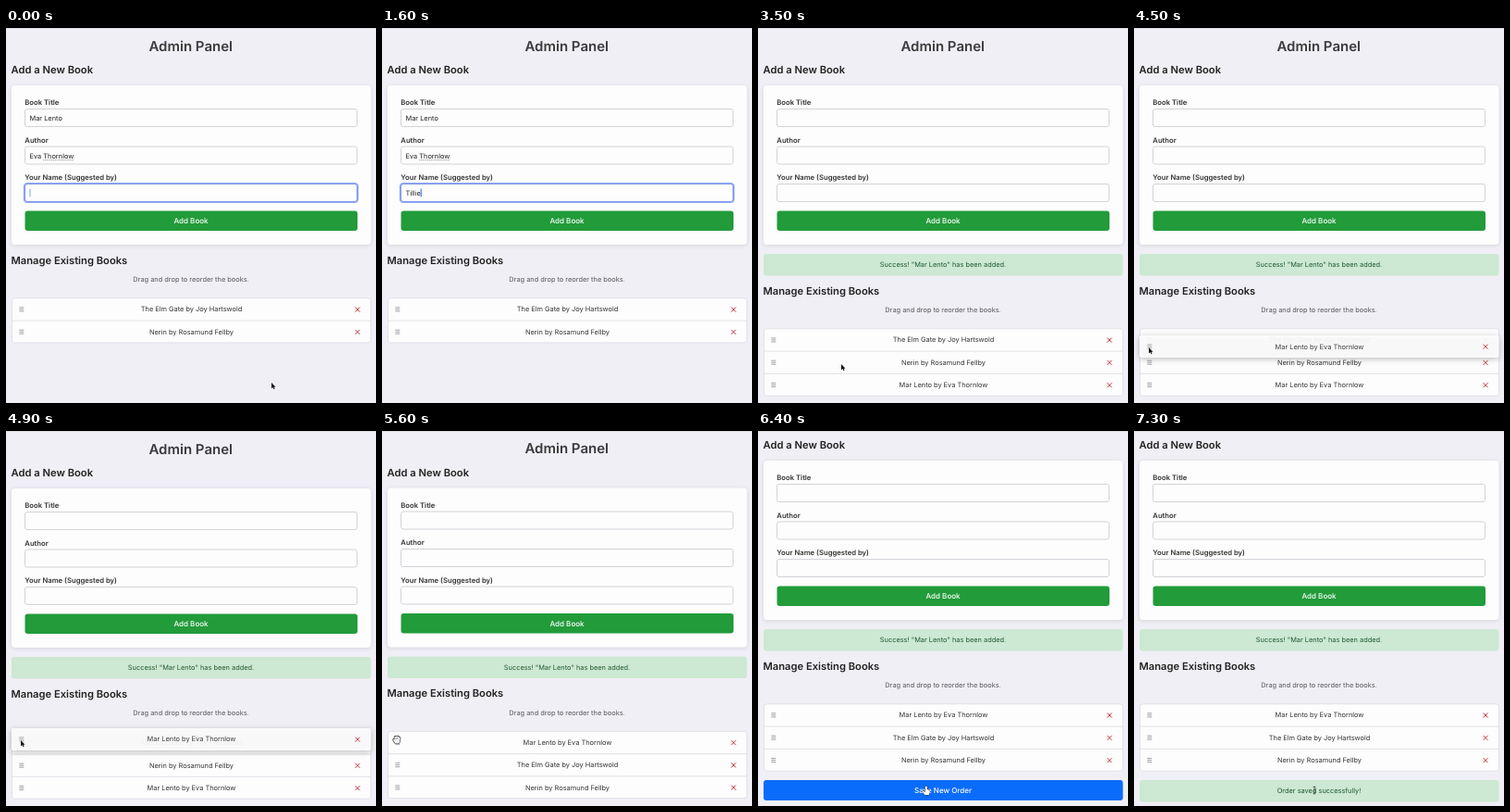
Animation of 400x405 px, one loop 7.4 s. Source, as an HTML page with a canvas:

```html
<!DOCTYPE html>
<html lang="en">
<head>
<meta charset="utf-8">
<title>Admin Panel</title>
<style>
  html, body { margin: 0; width: 100%; height: 100%; overflow: hidden; background: #f0eff5; }
  canvas { display: block; width: 400px; height: 405px; }
</style>
</head>
<body>
<canvas id="stage"></canvas>
<script>
const W = 400, H = 405, LOOP = 7400, STEP = 100;
const FAMILY = 'Inter, "Open Sans", Arial, sans-serif';
const BOOK = { title: 'Mar Lento', author: 'Eva Thornlow' };
const OLD_ROWS = ['The Elm Gate by Joy Hartswold', 'Nerin by Rosamund Fellby'];
const NEW_ROW = BOOK.title + ' by ' + BOOK.author;
const READER = 'Tillie';
const ROW_H = 24.3;

// Moments of the story, in ms
const AT = {
  type: 700, typeGap: 160, hover: 2300, click: 2600, added: 2800, leave: 3400,
  drag: 4100, drop: 5000, overSave: 6300, saved: 6700
};

// Key points: [time, x, y]
const POINTER = [
  [0, 287, 383], [1700, 283, 367], [2300, 203, 208], [3250, 203, 208],
  [3500, 90, 363], [3900, 16, 386], [4100, 16, 386], [4500, 16, 345],
  [4800, 16, 334], [5900, 16, 333], [6500, 195, 388], [LOOP, 195, 388]
];
const SCROLL = [[0, 0], [5500, 0], [5600, 0.5], [5700, 18], [5800, 31], [6000, 30], [LOOP, 30]];

const canvas = document.getElementById('stage');
const ctx = canvas.getContext('2d');
const dpr = window.devicePixelRatio || 1;
canvas.width = W * dpr;
canvas.height = H * dpr;
ctx.textRendering = 'geometricPrecision';

const smooth = p => p * p * (3 - 2 * p);

function along(keys, t) {
  let i = 0;
  while (i < keys.length - 2 && t >= keys[i + 1][0]) i++;
  const [a, b] = [keys[i], keys[i + 1]];
  const p = smooth(Math.min(1, (t - a[0]) / (b[0] - a[0])));
  return a.slice(1).map((v, k) => v + (b[k + 1] - v) * p);
}

function text(str, x, y, { size = 7.4, weight = 400, color = '#333', align = 'left' } = {}) {
  ctx.font = `${weight} ${size}px ${FAMILY}`;
  ctx.fillStyle = color;
  ctx.textAlign = align;
  ctx.fillText(str, x, y);
  return ctx.measureText(str).width;
}

function box(x, y, w, h, r, fill, stroke, line = 1) {
  ctx.beginPath();
  ctx.roundRect(x, y, w, h, r);
  if (fill) { ctx.fillStyle = fill; ctx.fill(); }
  if (stroke) { ctx.strokeStyle = stroke; ctx.lineWidth = line; ctx.stroke(); }
}

function shadowed(blur, dy, color, draw) {
  ctx.save();
  ctx.shadowBlur = blur * dpr;
  ctx.shadowOffsetY = dy * dpr;
  ctx.shadowColor = color;
  draw();
  ctx.restore();
}

function strokes(color, width, ...lines) {
  ctx.strokeStyle = color;
  ctx.lineWidth = width;
  ctx.beginPath();
  for (const [x1, y1, x2, y2] of lines) {
    ctx.moveTo(x1, y1);
    ctx.lineTo(x2, y2);
  }
  ctx.stroke();
}

function field(label, y, value, focused) {
  text(label, 20.3, y - 3.9, { size: 7.7, weight: 600 });
  if (focused) box(20, y + 0.1, 360, 19.8, 3, null, '#8fa9f6', 2.4);
  box(20.5, y + 0.5, 359, 19, 2.5, '#fdfdfe', focused ? '#7d98ea' : '#d3d3d8');
  return value ? text(value, 25.5, y + 13, { color: '#222' }) : 0;
}

function button(label, y, h, x, w, color) {
  box(x, y, w, h, 3, color);
  text(label, 200, y + h / 2 + 2.8, { size: 8, weight: 500, color: '#fff', align: 'center' });
}

function notice(str, y) {
  box(6, y, 388.5, 23.5, 3, '#cde8d3');
  text(str, 200, y + 14.4, { color: '#205a30', align: 'center' });
}

function rowContent(label, mid) {
  strokes('#8c8c90', 0.8, ...[-2, 0, 2].map(d => [14.3, mid + d, 19.3, mid + d]));
  text(label, 200.5, mid + 2.5, { align: 'center' });
  strokes('#c02a35', 0.95, [377.5, mid - 2.3, 382.5, mid + 2.7], [377.5, mid + 2.7, 382.5, mid - 2.3]);
}

function list(rows, top) {
  const h = rows.length * ROW_H;
  box(6.5, top, 388, h - 0.5, 3, '#fdfdfe', '#dfdfe4', 0.9);
  rows.forEach((label, i) => {
    const y = top + i * ROW_H;
    if (i) strokes('#dfdfe4', 0.9, [6.5, y, 394.5, y]);
    rowContent(label, y + 12.1);
  });
}

function ghost(mid) {
  const plate = () => box(6, mid - 12, 388.5, 24, 2, '#fdfdfe');
  ctx.save();
  ctx.globalAlpha = 0.75;
  shadowed(6, 1.5, 'rgba(0,0,0,.35)', plate);
  plate();
  ctx.globalAlpha = 0.95;
  rowContent(NEW_ROW, mid);
  ctx.restore();
}

const ARROW = new Path2D('M0 0V6.4L1.5 5.1L2.5 7.3L3.6 6.8L2.6 4.7H4.5Z');
const FINGER = new Path2D('M-1 0Q0-1 1 0V3L4 4V6.5L3 9H-1.5L-4 5.5L-3 5L-1 6Z');
const PALM = new Path2D('M-2.6-2.6Q-1.9-4-1-3.2Q0-4.6 1-3.2Q2.2-4 2.4-2.4Q3.9-2.6 3.7-.8L2.6 3.7H-2L-4 .4Q-3.8-1-2.4-.2Z');

function shape(path, x, y, fill, stroke, line) {
  ctx.save();
  ctx.translate(x, y);
  ctx.fillStyle = fill;
  ctx.strokeStyle = stroke;
  ctx.lineWidth = line;
  ctx.lineJoin = 'round';
  ctx.stroke(path);
  ctx.fill(path);
  ctx.restore();
}

function pointer(t) {
  if (t >= AT.type && t < 1700) return;
  const [x, y] = along(POINTER, t);
  const overHandle = t >= 3900 && t < AT.drag || t >= AT.drop && t < 6000;
  const overButton = t >= AT.hover && t < AT.leave || t >= AT.overSave && t < AT.saved;
  if (overHandle) {
    shape(PALM, x, y, '#f4f4f6', '#222', 1.3);
    strokes('#444', 0.5, [x - 1, y - 2.6, x - 0.8, y], [x + 1, y - 2.6, x + 0.8, y]);
  } else if (overButton) {
    shape(FINGER, x, y, '#fff', '#222', 1);
  } else if (t >= AT.saved) {
    strokes('#333', 0.8, [x, y - 3.5, x, y + 3.5],
      [x - 1.4, y - 3.8, x + 1.4, y - 3.8], [x - 1.4, y + 3.8, x + 1.4, y + 3.8]);
  } else {
    shape(ARROW, x, y, '#111', '#fff', 0.9);
  }
}

function form(t, added) {
  shadowed(5, 1, 'rgba(40,40,70,.13)', () => box(6, 62, 388.5, 172, 4, '#fdfdfe'));
  field('Book Title', 87, added ? '' : BOOK.title);
  const full = field('Author', 127.5, added ? '' : BOOK.author);
  if (!added) {
    // Spelling mark under the surname
    const surname = ctx.measureText(BOOK.author.split(' ')[1]).width;
    ctx.setLineDash([1, 0.8]);
    strokes('#777', 0.8, [25.5 + full - surname, 142.6, 25.5 + full, 142.6]);
    ctx.setLineDash([]);
  }

  const focused = t < AT.click;
  const count = Math.max(0, Math.floor((t - AT.type) / AT.typeGap) + 1);
  const width = field('Your Name (Suggested by)', 168, added ? '' : READER.slice(0, count), focused);
  const lit = t >= AT.type && t < 1800 ? 1 : 0.6 + 0.4 * Math.sin(t / 1000 * 2 * Math.PI);
  if (focused) strokes(`rgba(70,115,235,${lit})`, 1.1, [26 + width, 173.5, 26 + width, 182.5]);

  const hovered = t >= AT.hover && t < AT.leave;
  button('Add Book', 197.5, 21.5, 20.5, 359.5, hovered ? '#1f9136' : '#229b3a');
}

function draw(t) {
  const added = t >= AT.added, dropped = t >= AT.drop, saved = t >= AT.saved;
  const [scroll] = along(SCROLL, t);
  const shift = added ? 33 : 0;

  ctx.setTransform(dpr, 0, 0, dpr, 0, 0);
  ctx.fillStyle = '#f0eff5';
  ctx.fillRect(0, 0, W, H);

  ctx.save();
  ctx.translate(0, -scroll);
  text('Admin Panel', 199.7, 24.5, { size: 15, weight: 600, color: '#3a3a3d', align: 'center' });
  text('Add a New Book', 5.5, 49.3, { size: 11.2, weight: 600, color: '#222' });
  form(t, added);
  if (added) notice(`Success! "${BOOK.title}" has been added.`, 244);

  text('Manage Existing Books', 5.5, 254.6 + shift, { size: 11.2, weight: 600, color: '#222' });
  text('Drag and drop to reorder the books.', 200, 274 + shift, { color: '#58585c', align: 'center' });
  const rows = dropped ? [NEW_ROW, ...OLD_ROWS] : added ? [...OLD_ROWS, NEW_ROW] : OLD_ROWS;
  list(rows, 291.8 + shift);

  if (saved) notice('Order saved successfully!', 407);
  else if (dropped) button('Save New Order', 407, 22, 6, 388.5, '#0a6cfb');
  ctx.restore();

  if (t >= AT.drag && !dropped) ghost(along(POINTER, t)[1] - 1);
  ctx.fillStyle = '#dcdce1';
  ctx.fillRect(0, 0, W, 0.8);
  pointer(t);
}

const start = performance.now();
function tick() {
  const t = (performance.now() - start) % LOOP;
  draw(Math.floor(t / STEP) * STEP);
  requestAnimationFrame(tick);
}
tick();
</script>
</body>
</html>
```
